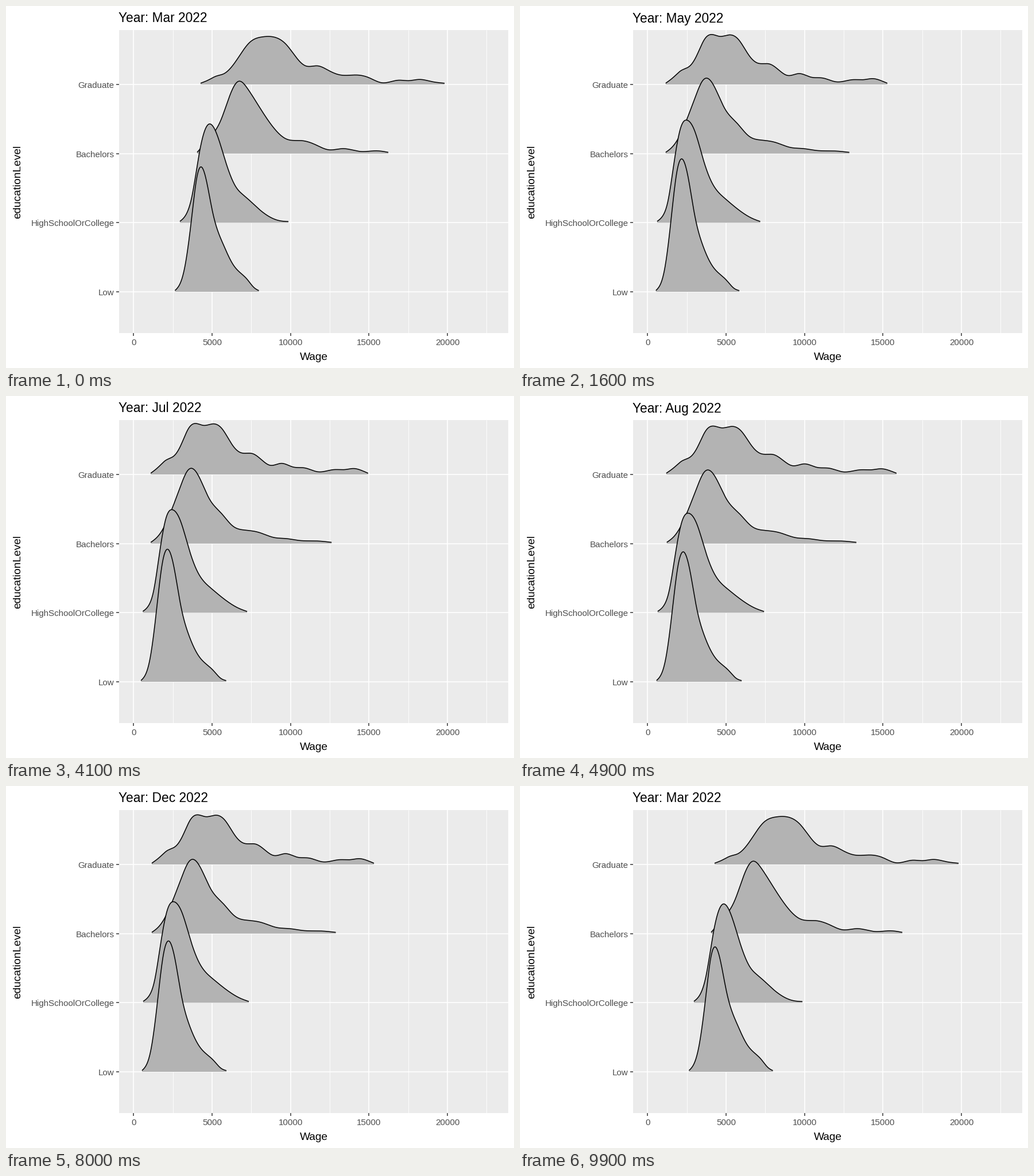
Animation, 885 px wide and 632 px high, one loop 10 s. Source, as a matplotlib script:

```python
import numpy as np
import matplotlib.pyplot as plt
from matplotlib.animation import FuncAnimation
from matplotlib.patches import Polygon, Rectangle

W, H, DPI = 885, 632, 100
PT = 72 / DPI
FRAMES, INTERVAL = 100, 100
SAMPLES = 400

LEVELS = ["Graduate", "Bachelors", "HighSchoolOrCollege", "Low"]
BASES = [137, 257.7, 378.4, 499]
MONTHS = ["Mar 2022", "Apr 2022", "May 2022", "Jun 2022", "Jul 2022", "Aug 2022",
          "Sep 2022", "Oct 2022", "Nov 2022", "Dec 2022", "Jan 2023", "Feb 2023"]

# Ridge outlines as (x, y) knots in stage pixels.
MARCH_GRADUATE = [
    (339, 134.8), (353, 129), (366, 122.5), (380, 118), (400, 97), (424, 64),
    (446, 54), (466, 54), (488, 67), (510, 95), (522, 104.5), (543, 104.5),
    (562, 112.5), (582, 120.3), (612, 120.5), (632, 125), (655, 134),
    (683, 129.6), (702, 130.3), (720, 128.2), (742, 132), (764, 134.8)]
MARCH_BACHELORS = [
    (333, 255.5), (355, 230), (374, 200), (392, 151), (405, 131.5), (420, 143),
    (440, 174), (470, 217), (488, 232), (515, 235), (540, 242.5), (562, 251),
    (587, 249), (618, 254), (645, 252.8), (666, 255.5)]
MARCH_COLLEGE = [
    (303, 376), (315, 361.5), (324, 332), (336, 261), (346, 218), (354, 206),
    (367, 223), (383, 273), (400, 315), (416, 332), (440, 354), (460, 368.5),
    (476, 374.7), (492, 376.3)]
MARCH_LOW = [
    (294.5, 496.7), (304, 483), (312, 453), (324, 365), (332, 302), (339, 281),
    (347, 296), (360, 360), (378, 415), (396, 452), (420, 477), (432, 491.5),
    (440.5, 496.9)]

JUNE_GRADUATE = [
    (254, 134.8), (268, 124), (281, 112.7), (297, 104), (308, 87), (322, 58),
    (333, 50), (349, 53.3), (366, 50.6), (381, 58.5), (400, 87), (414, 99.5),
    (436, 101.5), (453, 113), (467, 121.3), (487, 118), (508, 124.3),
    (528, 125.7), (552, 132.4), (580, 128.7), (600, 128.6), (616, 126.8),
    (630, 130.3), (641, 134.8)]
JUNE_BACHELORS = [
    (254, 255.5), (266, 245.5), (276, 231), (290, 200), (306, 158), (318, 131),
    (325.5, 126), (340, 143), (357, 179), (378, 204), (399, 227), (420, 234),
    (445, 238), (472, 247), (494, 248.9), (518, 252.3), (546, 253),
    (574.5, 255.5)]
JUNE_COLLEGE = [
    (239, 376), (249, 366), (258, 340), (268, 277), (280, 213), (291, 199.5),
    (304, 217), (320, 270), (334, 307.5), (356, 335), (388, 361),
    (404, 370.5), (418.5, 376.2)]
JUNE_LOW = [
    (237, 496.7), (246, 483), (252, 460), (262, 385), (273, 292), (282, 267),
    (293, 299), (304, 363), (318, 416.5), (336, 455), (359, 478), (373, 493),
    (382, 496.9)]

# Left end, peak x, right end and peak y of each ridge in 21, 22 and 23 day months.
APR = np.array([(251, 328, 623, 46.3), (251, 321.5, 561.5, 125),
                (238, 287, 418, 196), (234, 280, 383, 265.5)])
DEC = np.array([(254, 334, 641, 50.3), (254, 325.5, 574.5, 128),
                (239, 291.5, 423, 202), (237, 283, 384, 270.5)])
AUG = np.array([(255, 337, 658.5, 52.8), (256, 328, 588, 129.3),
                (240, 293, 425.5, 205), (238, 284.5, 386.5, 272.3)])
OCT = APR + 0.33 * (DEC - APR)
FEB = APR - 0.9 * (DEC - APR)


def spline(knots):
    """Natural cubic spline through the knots, evenly sampled in x."""
    x, y = np.array(knots, float).T
    h, n = np.diff(x), len(x)
    a, b = np.eye(n), np.zeros(n)
    slope = np.diff(y) / h
    for i in range(1, n - 1):
        a[i, i - 1:i + 2] = h[i - 1], 2 * (h[i - 1] + h[i]), h[i]
        b[i] = 6 * (slope[i] - slope[i - 1])
    m = np.linalg.solve(a, b)
    xs = np.linspace(x[0], x[-1], SAMPLES)
    k = np.clip(np.searchsorted(x, xs) - 1, 0, n - 2)
    l, r = xs - x[k], x[k + 1] - xs
    ys = ((m[k] * r**3 + m[k + 1] * l**3) / (6 * h[k])
          + (y[k] / h[k] - m[k] * h[k] / 6) * r
          + (y[k + 1] / h[k] - m[k + 1] * h[k] / 6) * l)
    return np.column_stack([xs, ys])


def warp(curve, base, fit):
    """Move the ends and the peak of a ridge."""
    left, peak, right, top = fit
    x, y = curve.T
    i = y.argmin()
    nx = np.interp(x, [x[0], x[i], x[-1]], [left, peak, right])
    foot = y[0]
    return np.column_stack([nx, foot - (foot - y) * (foot - top) / (foot - y[i])])


mar = np.array([spline(k) for k in (MARCH_GRADUATE, MARCH_BACHELORS,
                                    MARCH_COLLEGE, MARCH_LOW)])
jun = np.array([spline(k) for k in (JUNE_GRADUATE, JUNE_BACHELORS,
                                    JUNE_COLLEGE, JUNE_LOW)])


def fitted(fits):
    return np.array([warp(c, b, f) for c, b, f in zip(jun, BASES, fits)])


octo, dec = fitted(OCT), fitted(DEC)
STATES = [mar, fitted(APR), jun, jun, octo, fitted(AUG),
          dec, octo, dec, dec, dec, fitted(FEB)]
STARTS = [5, 14, 23, 32, 41, 49, 56, 64, 72, 80, 88, 96]
STEPS = [3 if s == 49 else 4 for s in STARTS]


def ease(t):
    return 4 * t**3 if t < 0.5 else 1 - 4 * (1 - t)**3


def pose(frame):
    """Ridge curves and month label at a frame."""
    k = sum(frame >= s for s in STARTS) - 1
    if k < 0:
        return STATES[0], MONTHS[0]
    t = min(1, (frame - STARTS[k] + 1) / STEPS[k])
    nxt = (k + 1) % len(STATES)
    e = ease(t)
    return (1 - e) * STATES[k] + e * STATES[nxt], MONTHS[nxt if t >= 0.5 else k]


plt.rcParams["font.family"] = "Liberation Sans"
fig = plt.figure(figsize=(W / DPI, H / DPI), dpi=DPI, facecolor="white")
ax = fig.add_axes([0, 0, 1, 1])
ax.set(xlim=(0, W), ylim=(H, 0))
ax.axis("off")

LEFT, TOP, RIGHT, BOTTOM = 197, 42, 875, 571


def rule(xs, ys, color, width):
    ax.plot(xs, ys, color=color, lw=width * PT, solid_capstyle="butt", zorder=1)


def label(x, y, text, size, color="black", ha="center", **kw):
    return ax.text(x, y, text, fontsize=size * PT, color=color, ha=ha,
                   va="baseline", **kw)


def wage_x(v):
    return 222.4 + v * 0.02733


ax.add_patch(Rectangle((LEFT, TOP), RIGHT - LEFT, BOTTOM - TOP,
                       fc="#EBEBEB", ec="none", zorder=0))
for v in range(2500, 25000, 5000):
    rule([wage_x(v)] * 2, [TOP, BOTTOM], "white", 0.9)
for v in range(0, 25000, 5000):
    x = wage_x(v)
    rule([x, x], [TOP, BOTTOM], "white", 1.6)
    rule([x, x], [BOTTOM, BOTTOM + 5], "#333333", 1.5)
    label(x, 592.5, str(v), 15.1, "#4D4D4D")
for name, y in zip(LEVELS, BASES):
    rule([LEFT, RIGHT], [y, y], "white", 1.6)
    rule([LEFT - 5, LEFT], [y, y], "#333333", 1.5)
    label(188.5, y + 6, name, 15.1, "#4D4D4D", ha="right")

label(536, 618, "Wage", 19.1)
label(25.5, 307, "educationLevel", 19.1, rotation=90, rotation_mode="anchor")
title = label(196.5, 28.5, "", 22.8, ha="left")

fills, lines = [], []
for i in range(len(LEVELS)):
    fills.append(ax.add_patch(Polygon([(0, 0), (1, 1)], fc="#B3B3B3", ec="none",
                                      zorder=2 + i)))
    lines += ax.plot([], [], color="black", lw=1.55 * PT, zorder=2.5 + i,
                     solid_capstyle="butt")


def draw(frame):
    curves, month = pose(frame)
    for curve, base, fill, line in zip(curves, BASES, fills, lines):
        ends = [(curve[-1, 0], base), (curve[0, 0], base)]
        fill.set_xy(np.vstack([curve, ends]))
        line.set_data(curve[:, 0], curve[:, 1])
    title.set_text("Year: " + month)
    return fills + lines + [title]


anim = FuncAnimation(fig, draw, frames=FRAMES, interval=INTERVAL,
                     init_func=lambda: draw(0), repeat=True, repeat_delay=0)
plt.show()
```
